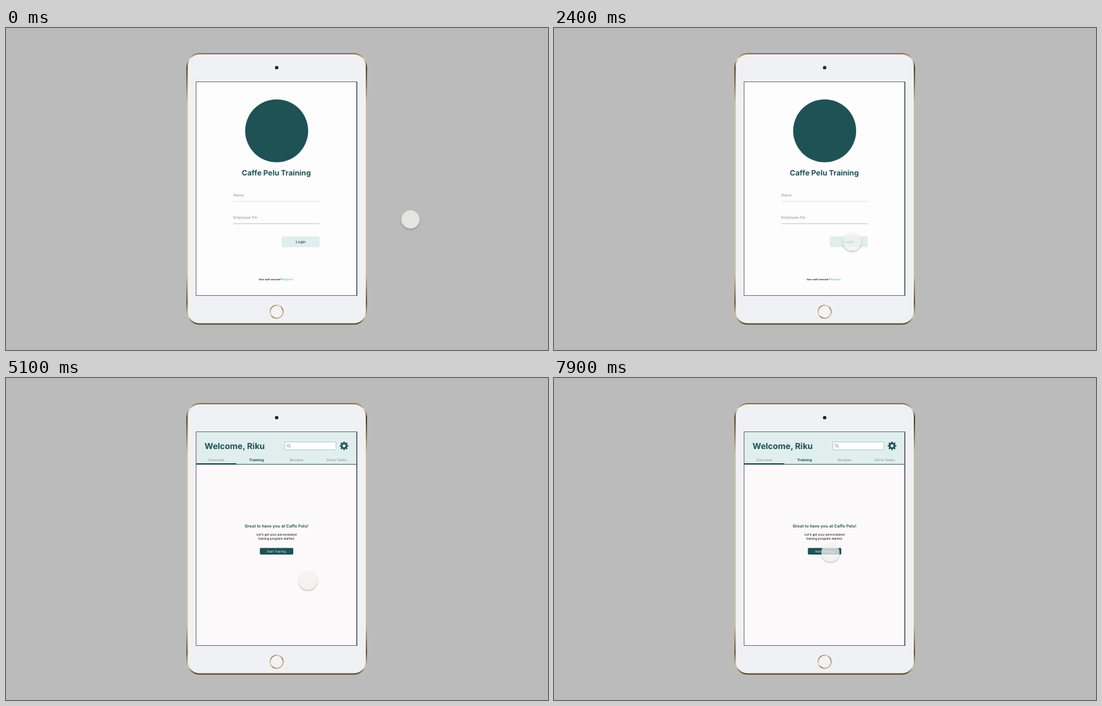
An HTML page that plays this animation: 800x476 px, repeating every 8000 ms.

```html
<!DOCTYPE html>
<html lang="en">
<head>
<meta charset="utf-8">
<title>Training app login</title>
<style>
  html, body { margin: 0; width: 100%; height: 100%; overflow: hidden; background: #bbb; }
  .stage { position: relative; width: 800px; height: 476px; overflow: hidden; }
  svg { display: block; }
  text { font-family: Inter, "Open Sans", sans-serif; text-rendering: geometricPrecision; }
  .mid { text-anchor: middle; }
  .teal { fill: #1f5255; }
  .semi { font-weight: 600; }
  .bold { font-weight: 700; }
  .hint { fill: #7f9c9d; font-size: 5.6px; }
  .tab { fill: #8b9292; font-size: 5.4px; text-anchor: middle; }
  .tab.on { fill: #1f5255; font-weight: 700; }
  .dashboard { animation: reveal 8s linear infinite; }
  .touch {
    position: absolute; left: 0; top: 0; width: 27px; height: 27px; border-radius: 50%;
    background: rgba(241, 241, 240, .77);
    box-shadow: 0 1.5px 2.5px rgba(0, 0, 0, .25);
    offset-rotate: 0deg;
    animation: glide 8s linear infinite;
  }
  @keyframes reveal {
    0%, 36.9% { opacity: 0; }
    48.1%, 100% { opacity: 1; }
  }
  /* Two curved moves: to the login button, then to the start button. */
  @keyframes glide {
    0% { offset-path: path("M597 283C520 270 440 260 440 316"); offset-distance: 0%; }
    3.75% {
      offset-path: path("M597 283C520 270 440 260 440 316"); offset-distance: 0%;
      animation-timing-function: ease-in-out;
    }
    28.75%, 53.74% { offset-path: path("M597 283C520 270 440 260 440 316"); offset-distance: 100%; }
    53.75% {
      offset-path: path("M440 316C452 280 470 238 408 258"); offset-distance: 0%;
      animation-timing-function: ease-in-out;
    }
    88.75%, 100% { offset-path: path("M440 316C452 280 470 238 408 258"); offset-distance: 100%; }
  }
</style>
</head>
<body>
<div class="stage">
<svg width="800" height="476" viewBox="0 0 800 476">
  <defs>
    <linearGradient id="rim" x1="0" y1="0" x2="0" y2="1">
      <stop offset="0" stop-color="#8d7654"/>
      <stop offset=".02" stop-color="#e3d6bd"/>
      <stop offset=".05" stop-color="#544225"/>
      <stop offset=".1" stop-color="#7d6947"/>
      <stop offset=".18" stop-color="#cdbc9b"/>
      <stop offset=".82" stop-color="#cdbc9b"/>
      <stop offset=".92" stop-color="#6b5535"/>
      <stop offset=".975" stop-color="#dccdb0"/>
      <stop offset="1" stop-color="#54432a"/>
    </linearGradient>
    <linearGradient id="ring" x1="0" y1="0" x2="1" y2="1">
      <stop offset="0" stop-color="#6f5838"/>
      <stop offset=".35" stop-color="#e3d3b5"/>
      <stop offset=".6" stop-color="#8e744d"/>
      <stop offset="1" stop-color="#e8dcc4"/>
    </linearGradient>
  </defs>

  <rect width="800" height="476" fill="#bbb"/>
  <rect x="267.2" y="38" width="264.8" height="399.6" rx="19" fill="#f0f1f4" stroke="url(#rim)" stroke-width="2"/>
  <circle cx="399.5" cy="58.5" r="2.6" fill="#272727"/>
  <circle cx="399.5" cy="419.5" r="9.7" fill="#f3f3f5" stroke="url(#ring)" stroke-width="1.5"/>

  <g>
    <rect x="281" y="79.5" width="237" height="316" fill="#fdfdfd"/>
    <circle class="teal" cx="399.5" cy="152" r="46.5"/>
    <text class="mid teal bold" x="399" y="217.5" font-size="11">Caffe Pelu Training</text>
    <text class="hint" x="335.5" y="249.2">Name</text>
    <path d="M335.5 256.4H463" stroke="#d8d8d8" stroke-width=".8"/>
    <text class="hint" x="335.5" y="281.7">Employee Pin</text>
    <path d="M335.5 289.3H463" stroke="#b4b4b4" stroke-width=".8"/>
    <rect x="407" y="308" width="56" height="16" rx="2.5" fill="#e0eeed"/>
    <text class="mid teal" x="435" y="318" font-size="5.6" font-weight="500">Login</text>
    <text x="373" y="373.4" font-size="3.7" font-weight="500" fill="#111">New staff member?</text>
    <text x="408" y="373.4" font-size="4" fill="#5cb79b">Register</text>
  </g>

  <g class="dashboard">
    <rect x="281" y="79.5" width="237" height="316" fill="#fcf9fa"/>
    <rect x="281" y="79.5" width="237" height="48" fill="#e0eeed"/>
    <path d="M281 127.6H518" stroke="#2b5a5d" stroke-width=".9"/>
    <path d="M281 127H340" stroke="#1f5255" stroke-width="2"/>
    <text class="teal bold" x="293" y="105.2" font-size="12.3">Welcome, Riku</text>
    <rect x="411.5" y="94.5" width="75.5" height="11.5" rx="1.5" fill="#fff" stroke="#a9bfc0" stroke-width=".8"/>
    <g fill="none" stroke="#7f9495" stroke-width=".8">
      <circle cx="417" cy="99.8" r="2"/>
      <path d="M418.5 101.3L420.3 103.2"/>
    </g>
    <g fill="none" stroke="#1f5255">
      <circle cx="499" cy="100.3" r="3.6" stroke-width="2.6"/>
      <circle cx="499" cy="100.3" r="5.3" stroke-width="2.2" pathLength="16" stroke-dasharray="1" stroke-dashoffset=".5"/>
    </g>
    <text class="tab" x="310.3" y="122.6">Overview</text>
    <text class="tab on" x="369.8" y="122.6">Training</text>
    <text class="tab" x="428.8" y="122.6">Recipes</text>
    <text class="tab" x="488" y="122.6">Store Tasks</text>
    <text class="mid teal semi" x="399.2" y="221" font-size="6.2">Great to have you at Caffe Pelu!</text>
    <g class="mid" font-size="4.55" font-weight="500" fill="#1b1b1b">
      <text x="399.2" y="232.5">Let's get your personalized</text>
      <text x="399.2" y="238.6">training program started.</text>
    </g>
    <rect class="teal" x="374.7" y="251.2" width="49.3" height="9.8" rx="1.4"/>
    <text class="mid" x="399.2" y="257.7" font-size="4.4" fill="#f2f6f6">Start Training</text>
  </g>

  <rect x="280.6" y="79.5" width="237.2" height="316" fill="none" stroke="#666" stroke-width=".9"/>
  <path d="M517.8 79.5V396" stroke="#444" stroke-width="1.1"/>
</svg>
<div class="touch"></div>
</div>
</body>
</html>
```
